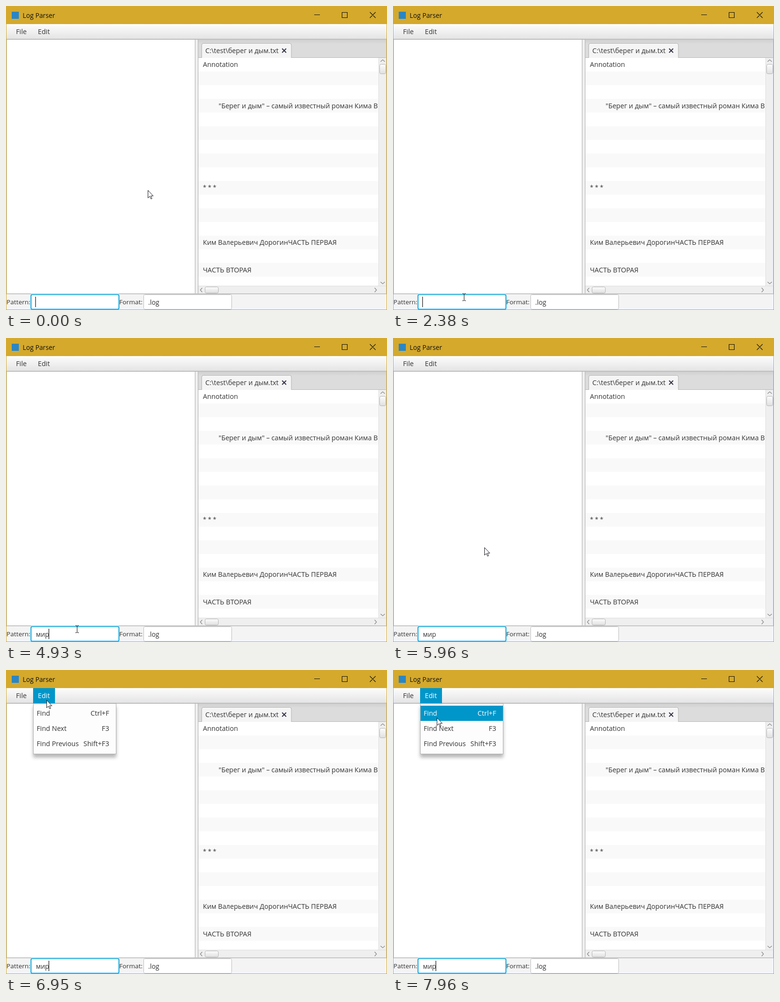
Animation of 801x639 px, one loop 8 s. Source, as an HTML page:

```html
<!DOCTYPE html>
<html lang="ru">
<head>
<meta charset="utf-8">
<title>Log Parser</title>
<style>
html, body { margin: 0; width: 100%; height: 100%; overflow: hidden; background: #fff; }
svg { display: block; width: 100vw; height: 100vh; }
text { font: 14.2px "Open Sans", "Noto Sans", sans-serif; fill: #333; white-space: pre; }
.title { font-size: 13.8px; fill: #111; }
.field { font-size: 13.9px; }
.label { font-size: 13.5px; }
.stars { font-size: 13px; }
.end { font-size: 14.4px; text-anchor: end; }
.lit text { fill: #fff; }
.line { fill: none; stroke: #b8b8b8; }
.chev { fill: none; stroke: #8b8b8b; stroke-width: 1.3; }
.win { fill: none; stroke: #111; stroke-width: 1.1; }

/* every track shares one 8 s clock and changes in hard steps */
.t { animation: 8s step-end infinite; }
#caret { animation-name: blink; }
#caret rect { animation-name: advance; }
#keys { animation-name: keys; }
#k1 { animation-name: k1; }
#k2 { animation-name: k2; }
#k3 { animation-name: k3; }
#edit { animation-name: edit; }
#menu { animation-name: menu; }
#find { animation-name: find; }
#pointer { animation-name: move; }
#arrow { animation-name: arrow; }
#beam { animation-name: beam; }

@keyframes blink {
  0%, 11.5%, 24.75%, 44.375%, 58.75%, 74.75%, 86.875%, 99.5% { opacity: 1; }
  5.625%, 18.125%, 37.5%, 53%, 68.5%, 80.125%, 92.875% { opacity: 0; }
}
@keyframes advance {
  0% { transform: translateX(0); }
  44.375% { transform: translateX(10.8px); }
  46.25% { transform: translateX(19.5px); }
  61.625%, 100% { transform: translateX(28px); }
}
@keyframes keys { 0%, 33.5% { opacity: 0; } 31.625% { opacity: 1; } }
@keyframes k1 { 0% { fill-opacity: 0; } 44.375%, 100% { fill-opacity: 1; } }
@keyframes k2 { 0% { fill-opacity: 0; } 46.25%, 100% { fill-opacity: 1; } }
@keyframes k3 { 0% { fill-opacity: 0; } 61.625%, 100% { fill-opacity: 1; } }
@keyframes edit { 0% { opacity: 0; } 82.125%, 100% { opacity: 1; } }
@keyframes menu {
  0% { opacity: 0; }
  83.125% { opacity: .35; }
  84.06% { opacity: .75; }
  85%, 100% { opacity: 1; }
}
@keyframes find { 0% { opacity: 0; } 87.875%, 100% { opacity: 1; } }
@keyframes arrow { 0%, 72.5%, 100% { opacity: 1; } 27.85% { opacity: 0; } }
@keyframes beam { 0%, 72.5%, 100% { opacity: 0; } 27.85% { opacity: 1; } }
@keyframes move {
  0% { transform: translate(298px, 387px); }
  20.25% { transform: translate(287px, 402px); }
  21.2% { transform: translate(262px, 440px); }
  22.1% { transform: translate(232px, 480px); }
  23.1% { transform: translate(208px, 515px); }
  24% { transform: translate(190px, 545px); }
  24.95% { transform: translate(177px, 566px); }
  25.9% { transform: translate(167px, 583px); }
  26.9% { transform: translate(159px, 596px); }
  27.85% { transform: translate(153px, 607px); }
  28.8% { transform: translate(150px, 611px); }
  29.75% { transform: translate(149px, 612px); }
  72.5% { transform: translate(160px, 588px); }
  73.45% { transform: translate(178px, 530px); }
  74.4% { transform: translate(192px, 440px); }
  75.4% { transform: translate(196px, 340px); }
  76.35% { transform: translate(188px, 250px); }
  77.3% { transform: translate(172px, 185px); }
  78.3% { transform: translate(150px, 135px); }
  79.25% { transform: translate(128px, 105px); }
  80.2% { transform: translate(110px, 85px); }
  81.1% { transform: translate(97px, 73px); }
  82.125% { transform: translate(85px, 63px); }
  87.875% { transform: translate(87px, 76px); }
  88.875% { transform: translate(90px, 91px); }
  90% { transform: translate(92px, 102px); }
  97.625% { transform: translate(92px, 101px); }
  99.5%, 100% { transform: translate(92px, 100px); }
}
</style>
</head>
<body>
<svg viewBox="0 0 801 639">
  <defs>
    <linearGradient id="bar" x2="0" y2="1"><stop stop-color="#fdfdfd"/><stop offset="1" stop-color="#e3e3e3"/></linearGradient>
    <linearGradient id="knob" x2="0" y2="1"><stop stop-color="#fcfcfc"/><stop offset="1" stop-color="#e0e0e0"/></linearGradient>
    <linearGradient id="tabs" x2="0" y2="1"><stop stop-color="#cfcfcf"/><stop offset=".25" stop-color="#dcdcdc"/><stop offset="1" stop-color="#dcdcdc"/></linearGradient>
    <pattern id="rows" x="404" y="109" width="379" height="57.5" patternUnits="userSpaceOnUse">
      <rect width="379" height="57.5" fill="#fff"/>
      <rect y="28.75" width="379" height="28.75" fill="#f9f9f9"/>
    </pattern>
    <clipPath id="list"><rect x="404" y="109" width="379" height="479"/></clipPath>
    <filter id="shade" x="-10%" y="-10%" width="120%" height="135%"><feDropShadow dx="0" dy="7" stdDeviation="3.5" flood-opacity=".28"/></filter>
  </defs>

  <!-- window -->
  <rect width="801" height="639" fill="#d4a92c"/>
  <rect x="1" y="38" width="799" height="600" fill="#f4f4f4"/>
  <rect x="12" y="12" width="15" height="15" fill="#2a86c4"/>
  <text class="title" x="35" y="25">Log Parser</text>
  <path class="win" d="M648 18.5h12M706.5 13.5h11v11h-11zM765 13l12 12M777 13l-12 12"/>

  <!-- menu bar -->
  <rect x="1" y="38" width="799" height="32" fill="url(#bar)"/>
  <path class="line" d="M1 69.5H800"/>
  <text x="21" y="59">File</text>
  <text x="67" y="59">Edit</text>
  <g id="keys" class="t" opacity="0"><path d="M21 64.5h7M67 64.5h7" stroke="#333"/></g>

  <!-- split panes -->
  <rect x="1" y="70" width="396" height="535" fill="#fff"/>
  <rect x="398" y="70" width="6" height="535" fill="#f0f0f0"/>
  <rect x="404" y="70" width="396" height="39" fill="url(#tabs)"/>
  <path class="line" d="M404 108.5H800"/>
  <path d="M411.5 109V82q0-3.5 3.5-3.5H596.5q3.5 0 3.5 3.5V109" fill="#f5f5f5" stroke="#b0b0b0"/>
  <text x="419" y="99">C:\test\берег и дым.txt</text>
  <path d="M580.5 89.500l8.500 8.500M589 89.500l-8.500 8.500" stroke="#33334a" stroke-width="2"/>

  <g clip-path="url(#list)">
    <rect x="404" y="109" width="379" height="479" fill="url(#rows)"/>
    <text x="414" y="128">Annotation</text>
    <text x="447" y="215">"Берег и дым" – самый известный роман Кима В</text>
    <text class="stars" x="414" y="386">* * *</text>
    <text x="414" y="502">Ким Валерьевич ДорогинЧАСТЬ ПЕРВАЯ</text>
    <text x="414" y="560">ЧАСТЬ ВТОРАЯ</text>
  </g>

  <!-- scroll bars -->
  <path d="M783 109h17v496H404v-17h379z" fill="#efefef"/>
  <path class="line" d="M783.5 109V588M404 588.5H800" style="stroke:#dedede"/>
  <rect x="785.5" y="122.5" width="13" height="20" rx="3" fill="url(#knob)" stroke="#b4b4b4"/>
  <rect x="418.5" y="590.5" width="28" height="13" rx="3" fill="url(#knob)" stroke="#b4b4b4"/>
  <path class="chev" d="M787.5 117l4.500-4 4.500 4M787.5 580l4.500 4 4.500-4M412.5 592.5l-4 4.500 4 4.500M775 592.5l4 4.500-4 4.500"/>
  <rect class="line" x="1.5" y="70.5" width="798" height="534" style="stroke:#c4c4c4"/>
  <path class="line" d="M397.6 70V605M403.9 70V605" stroke-width="1.25"/>

  <!-- search fields -->
  <rect x="1" y="605" width="799" height="33" fill="#f4f4f4"/>
  <path class="line" d="M1 605.5H800" style="stroke:#c8c8c8"/>
  <rect x="52.5" y="606.5" width="185" height="31" rx="3" fill="#fff" stroke="#d2eef7" stroke-width="4"/>
  <rect x="52.5" y="606.5" width="185" height="31" rx="3" fill="none" stroke="#039ed3" stroke-width="1.6"/>
  <text class="field" x="63" y="628"><tspan id="k1" class="t" fill-opacity="0">м</tspan><tspan id="k2" class="t" fill-opacity="0">и</tspan><tspan id="k3" class="t" fill-opacity="0">р</tspan></text>
  <g id="caret" class="t"><rect class="t" x="61.5" y="611" width="1.3" height="22" fill="#222"/></g>
  <rect x="289.5" y="606.5" width="185" height="31" rx="3" fill="#fff" stroke="#bcbcbc"/>
  <path d="M291 607.5H473" stroke="#eee"/>
  <text class="label" x="1" y="627">Pattern:</text>
  <text class="label" x="238" y="627">Format:</text>
  <text class="field" x="299" y="628">.log</text>
  <path d="M0 638.5H801M.5 38V639M800.5 38V639" stroke="#d4a92c"/>

  <!-- edit menu -->
  <g id="menu" class="t" opacity="0">
    <rect x="57.5" y="70.5" width="174" height="106" fill="#fdfdfd" stroke="#adadad" filter="url(#shade)"/>
    <text x="64.5" y="96">Find</text><text class="end" x="217" y="96">Ctrl+F</text>
    <text x="64.5" y="128">Find Next</text><text class="end" x="217" y="128">F3</text>
    <text x="64.5" y="160">Find Previous</text><text class="end" x="217" y="160">Shift+F3</text>
  </g>
  <g id="find" class="t lit" opacity="0">
    <rect x="58" y="75" width="173" height="32" fill="#0096c9"/>
    <text x="64.5" y="96">Find</text><text class="end" x="217" y="96">Ctrl+F</text>
  </g>
  <g id="edit" class="t lit" opacity="0">
    <rect x="57" y="38" width="46" height="32" fill="#0096c9"/>
    <text x="67" y="59">Edit</text>
  </g>

  <!-- pointer -->
  <g id="pointer" class="t">
    <path id="arrow" class="t" d="M.5.5V16.5L4.2 13 6.8 18.6 9 17.6 6.6 12.2H11.5Z" fill="#fff" stroke="#15151f"/>
    <path id="beam" class="t" opacity="0" d="M-3-7.5H-1L.5-6.5 2-7.5H4M.5-6.5V6.5M-3 7.5H-1L.5 6.5 2 7.5H4" fill="none" stroke="#111"/>
  </g>
</svg>
</body>
</html>
```
